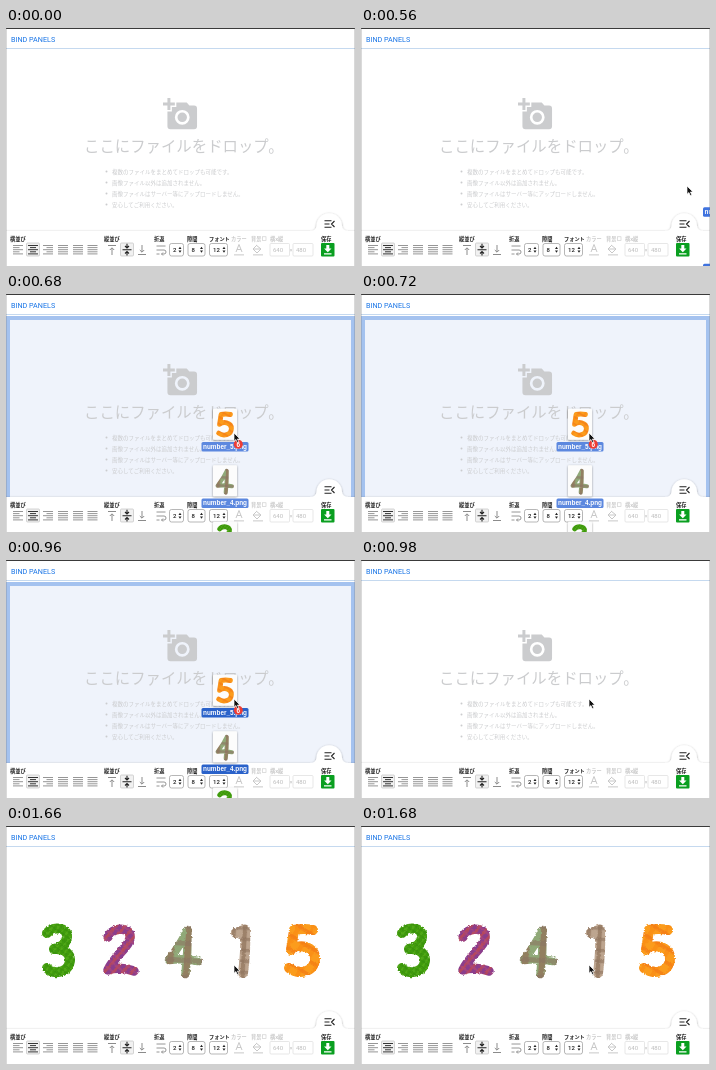
An HTML page that plays this animation: 349x238 px, repeating every 1.7 s.

```html
<!DOCTYPE html>
<html lang="ja">
<head>
<meta charset="utf-8">
<title>Drop files</title>
<style>
html, body { margin: 0; width: 100%; height: 100%; overflow: hidden; background: #fff; }
svg { display: block; width: 349px; height: 238px; }
text { font-family: "Noto Sans CJK JP", "Noto Sans CJK", sans-serif; }
.latin { font-family: Roboto, sans-serif; }
.file { font: bold 6.4px "Liberation Sans", sans-serif; text-anchor: middle; }
.caption { font-size: 5.2px; font-weight: 700; }
.digit path { fill: none; stroke-linecap: round; stroke-linejoin: round; }
</style>
</head>
<body>
<svg id="stage" viewBox="0 0 349 238" xmlns="http://www.w3.org/2000/svg"></svg>
<script>
const LOOP = 1700;
const stage = document.getElementById('stage');
const rect = (x, y, w, h, attrs = '') => `<rect x="${x}" y="${y}" width="${w}" height="${h}" ${attrs}/>`;
const line = (d, color, width = 1) => `<path d="${d}" fill="none" stroke="${color}" stroke-width="${width}"/>`;
const label = (x, y, str, attrs = '') => `<text x="${x}" y="${y}" ${attrs}>${str}</text>`;
const caption = (x, str, color = '#222') => label(x, 213, str, `class="caption" fill="${color}"`);

// Woven fabrics: base colour, two band colours, cell size, rotation
const fabric = (id, base, a, b, size, angle) => `
  <pattern id="p${id}" width="${size}" height="${size}" patternUnits="userSpaceOnUse" patternTransform="rotate(${angle})">
    ${rect(0, 0, size, size, `fill="${base}"`)}
    ${rect(0, 0, size * .38, size, `fill="${a}" opacity=".75"`)}
    ${rect(0, 0, size, size * .3, `fill="${b}" opacity=".6"`)}
  </pattern>`;

const digits = [
  [3, 10, 'M41 107C47 100 62 101 61 111C60 119 53 122 48 123C58 122 66 128 63.500 137C61 147 47 149 41 142'],
  [2, 9.5, 'M102 111C105 102 122 100 124 109C126 119 109 129 102 144C111 141 119 142 128 145'],
  [4, 8.5, 'M181.500 104C176 116 169 126 163 134Q178 132 192 135M181.500 104Q182 126 179.500 148'],
  [1, 10, 'M230 107L239 103.500Q240 126 237 147'],
  [5, 10, 'M307 104Q297 102 288 104L285 124C292 117 309 120 309 132C309 147 292 149 283 142']
];
const digitShape = ([n, width, d]) =>
  `<g id="d${n}" class="digit"><path d="${d}" stroke="url(#p${n})" stroke-width="${width}"/></g>`;

const defs = `<defs>
  ${fabric(3, '#3f9b0b', '#57ad1d', '#348b08', 5, 35)}
  ${fabric(2, '#8b3d8c', '#c44a4a', '#b04a78', 7, 40)}
  ${fabric(4, '#90a978', '#927159', '#8b7562', 17, 4)}
  ${fabric(1, '#bda58f', '#93775f', '#8e735e', 11, 3)}
  ${fabric(5, '#fb9c1c', '#f98c17', '#f27418', 12, 32)}
  <filter id="fuzz" x="-10%" y="-10%" width="120%" height="120%">
    <feTurbulence type="fractalNoise" baseFrequency=".45" numOctaves="2" seed="4"/>
    <feDisplacementMap in="SourceGraphic" scale="3" xChannelSelector="R" yChannelSelector="G"/>
  </filter>
  <filter id="shade" x="-30%" y="-30%" width="160%" height="160%">
    <feDropShadow dx="0" dy=".8" stdDeviation="1.1" flood-opacity=".4"/>
  </filter>
  ${digits.map(digitShape).join('')}
</defs>`;

const header = `${label(5, 13.6, 'BIND PANELS', 'class="latin" font-size="7.2" fill="#1673e6"')}
  ${line('M0 20.5H349', '#c5d9ef')}`;

const notes = [
  '複数のファイルをまとめてドロップも可能です。',
  '画像ファイル以外は追加されません。',
  '画像ファイルはサーバー等にアップロードしません。',
  '安心してご利用ください。'
];
const prompt = `<g id="prompt" fill="#cbccce">
  <path transform="translate(157 68.6) scale(1.48)" fill-rule="evenodd" d="M3 4V1h2v3h3v2H5v3H3V6H0V4zM6 10V7h3V4h7l1.830 2H21a2 2 0 0 1 2 2v12a2 2 0 0 1-2 2H5a2 2 0 0 1-2-2V10zM13 19a5 5 0 1 0 0-10a5 5 0 1 0 0 10zM13 17.200a3.200 3.200 0 1 1 0-6.400a3.200 3.200 0 1 1 0 6.400z"/>
  ${label(78, 123.5, 'ここにファイルをドロップ。', 'font-size="15.4"')}
  ${notes.map((s, i) => `<circle cx="100.500" cy="${143.5 + i * 11}" r="1"/>` +
    label(106, 145.6 + i * 11, s, 'font-size="5.5" font-weight="500"')).join('')}
</g>`;

const alignIcon = (cx, short, side, color) => [0, 1, 2, 3, 4].map(i => {
  const w = i % 2 ? short : 10;
  const x = cx - 5 + (10 - w) * side;
  return line(`M${x} ${217.5 + i * 2.1}h${w}`, color, .9);
}).join('');
const active = x => rect(x - 6.5, 215, 13, 13, 'rx="1" fill="#f1f1f1" stroke="#bbb" stroke-width=".6"');
const select = (x, w, value) =>
  rect(x, 215.5, w, 12.5, 'rx="2" fill="#fff" stroke="#999" stroke-width=".7"') +
  label(x + 3.5, 223.8, value, 'class="latin" font-size="6" font-weight="500" fill="#222"') +
  `<path d="M${x + w - 5} 221l1.500-2.200l1.500 2.200zm0 1.600l1.500 2.200l1.500-2.200z" fill="#222"/>`;
const sizeBox = (x, w, value) =>
  rect(x, 215.5, w, 12.5, 'rx="1" fill="#fff" stroke="#ddd" stroke-width=".7"') +
  label(x + 3, 223.8, value, 'class="latin" font-size="6" fill="#bbb"');

const PALE = '#c8c8c8', GREY = '#8b8b8b', DARK = '#222';
const toolbar = `<g>
  <path d="M-3 203H304Q310 203 310.500 198A12.700 12.700 0 0 1 336 198Q336.500 203 343 203H352V242H-3Z"
    fill="#fff" filter="url(#shade)"/>
  ${line('M318.500 192.800h7M318.500 196h5M318.500 199.200h7M328.500 193l-3 3l3 3', DARK, 1.1)}
  ${caption(4, '横並び')}${caption(98, '縦並び')}${caption(148, '折返')}${caption(181, '隙間')}
  ${caption(203, 'フォント')}${caption(225, 'カラー', PALE)}${caption(245, '背景', PALE)}
  ${rect(256.5, 208.800, 3.500, 3.500, `fill="none" stroke="${PALE}" stroke-width=".6"`)}
  ${caption(264, '横x縦', PALE)}${caption(315, '保存')}
  ${active(27)}${active(121)}
  ${alignIcon(12, 6.5, 0, GREY)}${alignIcon(27, 6, .5, DARK)}${alignIcon(42, 6.5, 1, GREY)}
  ${[57, 72, 86.5].map(x => alignIcon(x, 10, 0, GREY)).join('')}
  ${line('M102 217.500h8M106 227v-7M103.800 222l2.200-2.200l2.200 2.200', GREY)}
  ${line('M116.500 221.700h9M121 215.800v4M121 227.600v-4M119 218l2 2l2-2M119 225.500l2-2l2 2', DARK, 1.1)}
  ${line('M132 226.500h8M136 217v7M133.800 222l2.200 2.200l2.200-2.200', GREY)}
  ${line('M150.500 218h9M150.500 222h7.500a2 2 0 0 1 0 4h-2.500M157 224.500l-1.500 1.500l1.500 1.500M150.500 226h3', GREY, .9)}
  ${select(163.5, 14, '2')}${select(182, 17, '8')}${select(203.5, 18, '12')}
  ${line('M230 224l3-7.500l3 7.500M231 221.500h4', PALE)}
  ${line('M228 226.800h10', '#ddd', 1.6)}
  ${line('M250 217l5 4l-4 4l-4-4l3.500-3.500M247.500 221h7', PALE)}
  ${line('M247 226.800h10', '#ddd', 1.6)}
  ${sizeBox(264, 19.5, '640')}${sizeBox(287, 20, '480')}
  ${label(283.700, 223.8, '×', 'class="latin" font-size="5" fill="#bbb"')}
  ${rect(315, 215, 13.5, 13.5, 'rx="1" fill="#0a9f20"')}
  <path d="M320.300 217h3v3.500h2.200l-3.700 3.700l-3.700-3.700h2.200zM318 225.300h7.500v1.300h-7.500z" fill="#fff"/>
</g>`;

const dropZone = `<g id="zone">${rect(2, 24, 345, 216, 'fill="#eff3fb" stroke="#a4c2ef" stroke-width="4"')}</g>`;
const result = `<g id="result" filter="url(#fuzz)">${digits.map(d => `<use href="#d${d[0]}"/>`).join('')}</g>`;

const fileItem = ([n, cx], i) => `<g transform="translate(0 ${i * 56.5})">
  ${rect(-12, -38, 24, 31, 'rx="1" fill="#fcfcfc" filter="url(#shade)"')}
  <use href="#d${n}" transform="translate(0 -22) scale(.49) translate(${-cx} -125)"/>
  ${rect(-23.5, -4.7, 47, 9.4, 'rx="1.5" class="tag"')}
  ${label(0, 2, `number_${n}.png`, 'class="file"')}
</g>`;
const drag = `<g id="drag">${[[5, 296], [4, 178], [3, 52]].map(fileItem).join('')}
  <circle cx="13.300" cy="-2.500" r="4.500" fill="#ee3e35"/>
  ${label(13.3, -.2, '6', 'class="file" fill="#fff"')}
</g>`;
const cursor = `<path id="cursor" d="M0 0V8.300L1.900 6.500L3.300 9.600L4.800 8.900L3.400 6H6Z"
  fill="#111" stroke="#fff" stroke-width=".7"/>`;

stage.innerHTML = defs + rect(0, 0, 349, 238, 'fill="#fff"') + dropZone + header + prompt + result +
  toolbar + drag + cursor +
  line('M0 .5H349', '#3a3a3a') + line('M.2 0V238M348.800 0V238', '#777', .4);

// Each step is [time in ms, value, easing]; values hold unless an easing is given
function play(selector, property, steps) {
  const frames = steps.map(([time, value, easing = 'step-end']) =>
    ({ offset: time / LOOP, [property]: value, easing }));
  frames.push({ offset: 1, [property]: steps[steps.length - 1][1] });
  for (const el of document.querySelectorAll(selector)) {
    el.animate(frames, { duration: LOOP, iterations: Infinity }).startTime = 0;
  }
}
const show = (selector, from, to) =>
  play(selector, 'visibility', [[0, 'hidden'], [from, 'visible'], [to, 'hidden']]);
const at = (x, y) => `translate(${x}px, ${y}px)`;

show('#zone', 580, 980);
show('#drag', 560, 980);
play('#prompt', 'visibility', [[0, 'visible'], [1000, 'hidden']]);
play('#result', 'visibility', [[0, 'hidden'], [1000, 'visible']]);
play('#cursor', 'visibility', [[0, 'hidden'], [560, 'visible']]);
play('#drag', 'transform', [[0, at(365.5, 184)], [580, at(248.5, 158.3)], [680, at(219, 152.8)]]);
play('#cursor', 'transform', [[0, at(326, 158)], [580, at(241, 141)], [680, at(228, 139)]]);
play('.tag', 'fill', [[0, '#3f73df'], [580, '#86adf0'], [680, '#5c88df', 'steps(4, end)'], [960, '#2a62ca']]);
play('#drag .file', 'fill', [[0, '#fff'], [580, '#20397a'], [680, '#fff']]);
</script>
</body>
</html>
```
